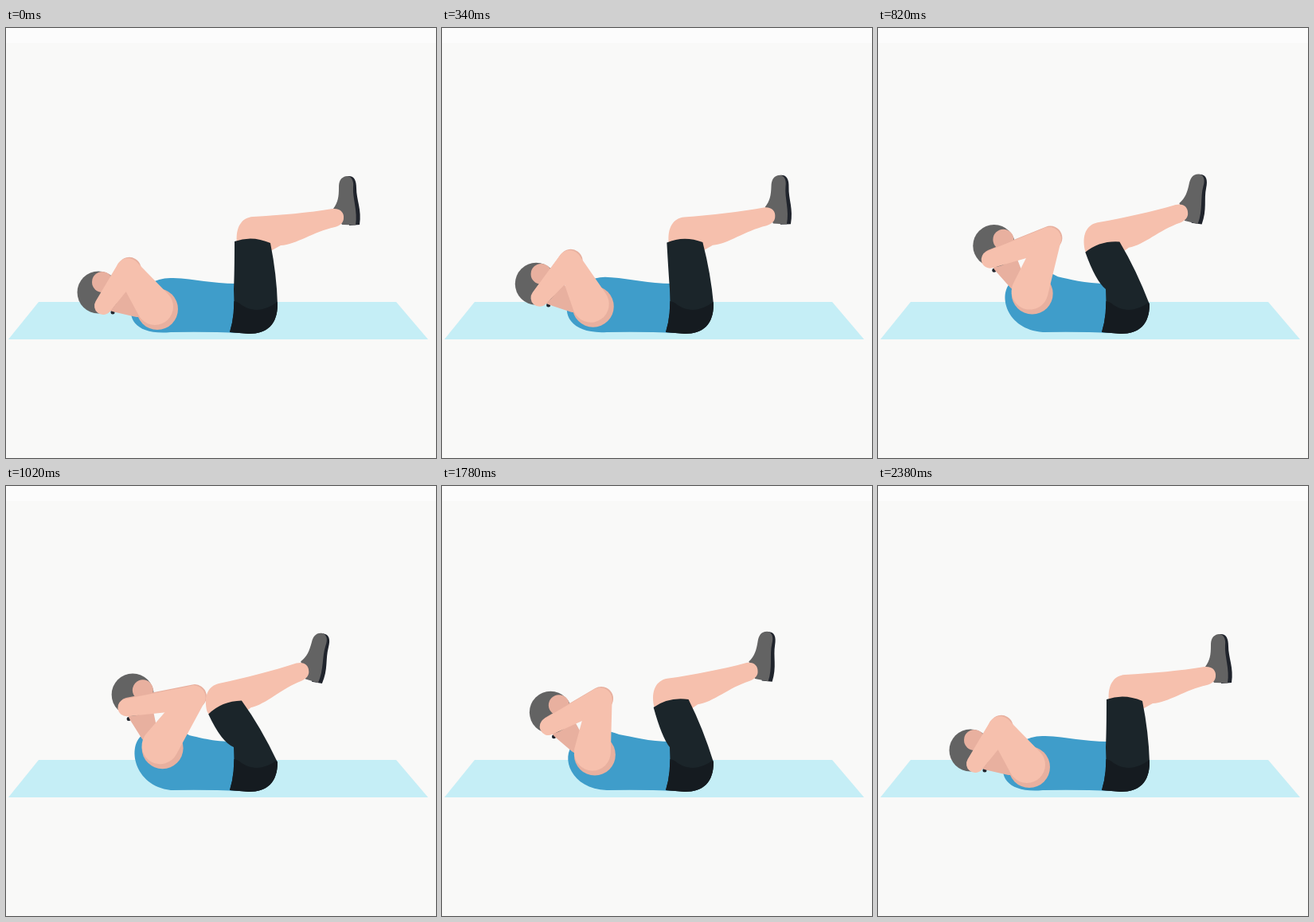
Animation of 540x540 px, one loop 2.5 s. Source, as an HTML page with a canvas:

```html
<!DOCTYPE html>
<html lang="en">
<head>
<meta charset="utf-8">
<title>Crunches</title>
<style>
html, body { margin: 0; width: 100%; height: 100%; overflow: hidden; background: #f9f9f8; }
canvas { display: block; width: 540px; height: 540px; }
</style>
</head>
<body>
<canvas id="stage" width="540" height="540"></canvas>
<script>
const ctx = document.getElementById('stage').getContext('2d');
const LOOP = 2500, STEP = 20, PEAK = 1240;
const COLOR = {
  wall: '#f9f9f8', top: '#fcfcfc', mat: '#c5eef6', shirt: '#3f9dca', shorts: '#1b252a',
  seat: '#151b20', skin: '#f6c0ad', shade: '#e8b09f', grey: '#636363', sole: '#20242c'
};
const CHEST = [222, 349], HIP = [313, 352];
const MAX_CURL = 47.8;
const rad = degrees => degrees * Math.PI / 180;

// Trunk angle in degrees: rise, a held top, and the same way back.
function curlAngle(t) {
  if (t > 1180 && t < 1460) t = PEAK;
  const u = Math.min(1, Math.max(0, (1150 - Math.abs(t - PEAK)) / 1100));
  return MAX_CURL * (1 - Math.cos(Math.PI * u)) / 2;
}

// Returns a function that turns points about a pivot.
function turner([px, py], degrees) {
  const c = Math.cos(rad(degrees)), s = Math.sin(rad(degrees));
  return (x, y) => [px + (x - px) * c - (y - py) * s, py + (x - px) * s + (y - py) * c];
}

function fill(color, path) {
  ctx.fillStyle = color;
  ctx.fill(path instanceof Path2D ? path : new Path2D(path));
}

function disc(color, [x, y], r) {
  const path = new Path2D();
  path.arc(x, y, r, 0, 2 * Math.PI);
  fill(color, path);
}

// Tapered limb with round ends.
function limb(color, [x1, y1], r1, [x2, y2], r2) {
  const dir = Math.atan2(y2 - y1, x2 - x1);
  const spread = Math.acos((r1 - r2) / Math.hypot(x2 - x1, y2 - y1));
  const path = new Path2D();
  path.arc(x1, y1, r1, dir + spread, dir - spread + 2 * Math.PI);
  path.arc(x2, y2, r2, dir - spread, dir + spread);
  path.closePath();
  fill(color, path);
}

function at([x, y], degrees, draw) {
  ctx.save();
  ctx.translate(x, y);
  ctx.rotate(rad(degrees));
  draw();
  ctx.restore();
}

function drawTorso(angle) {
  const upper = turner(CHEST, angle * 0.7);
  const lower = turner(CHEST, angle * 0.2);
  const collar = upper(160, 344);
  fill(COLOR.shirt, `M${collar}C${upper(150, 366)} ${lower(165, 386)} 207 382
    Q250 381 295 383V321C262 322 240 315 ${upper(210, 314)}Q${upper(178, 312)} ${collar}Z`);
}

function drawHead(body) {
  disc(COLOR.sole, body(134, 357), 2.5);
  limb(COLOR.shade, body(139, 341), 16, body(165, 352), 11);
  disc(COLOR.grey, body(116, 332), 26.5);
  disc(COLOR.shade, body(121, 319), 13);
}

function drawArm(body, angle) {
  const hand = body(122, 349);
  const [x, y] = body(190, 353);
  const swing = rad(1.52 * angle - 127), length = 61 + angle * 0.3;
  const elbow = [x + length * Math.cos(swing), y + length * Math.sin(swing)];
  const behind = ([px, py]) => [px + 1.5, py - 1.5];
  limb(COLOR.shade, behind(hand), 11, behind(elbow), 15);
  disc(COLOR.shade, [x, y], 26);
  limb(COLOR.skin, hand, 11, elbow, 15);
  limb(COLOR.skin, elbow, 15, [x - 3, y - 3], 23);
}

function drawLegs(angle) {
  const thigh = turner(HIP, -0.55 * angle);
  const knee = thigh(307, 256);
  const shin = -0.2 * angle;
  const ankle = turner(knee, shin)(knee[0] + 110, knee[1] - 18);

  at(ankle, angle / 3, () => {
    fill(COLOR.sole, 'M12-52C20-53 23-47 23-37C23-22 30-10 27 9L14 10L10-40Z');
    fill(COLOR.grey, 'M11-52C3-51 1-45 1-38C1-26 0-19-6-11L5 9L22 9.5C25-8 18-24 19-38C20-46 17-52 11-52Z');
  });
  at(ankle, shin, () => fill(COLOR.skin,
    'M-127 32C-129 12-121 0-107-1C-72-3-37-6-7-11C3-12 8-6 7 1C7 6 3 10-4 12C-32 18-52 34-72 35L-90 45L-120 45Z'));

  const hem = thigh(287, 268);
  const shorts = new Path2D(`M${hem}Q${thigh(309, 260)} ${thigh(332, 270)}Q${thigh(340, 310)} 341 347
    C341 372 328 384 305 384L281 382Q288 360 286 328Q${thigh(287, 307)} ${hem}Z`);
  fill(COLOR.shorts, shorts);
  ctx.save();
  ctx.clip(shorts);
  fill(COLOR.seat, 'M280 343Q290 342 296 348Q318 362 342 343V386H280Z');
  ctx.restore();
}

function draw(angle) {
  const body = turner(CHEST, angle);
  ctx.fillStyle = COLOR.wall;
  ctx.fillRect(0, 0, 540, 540);
  ctx.fillStyle = COLOR.top;
  ctx.fillRect(0, 0, 540, 19);
  fill(COLOR.mat, 'M41 344H490L530 391H3Z');
  drawTorso(angle);
  drawHead(body);
  drawArm(body, angle);
  drawLegs(angle);
}

const start = performance.now();
function tick() {
  const t = (performance.now() - start) % LOOP;
  draw(curlAngle(Math.floor(t / STEP) * STEP));
  requestAnimationFrame(tick);
}
tick();
</script>
</body>
</html>
```
